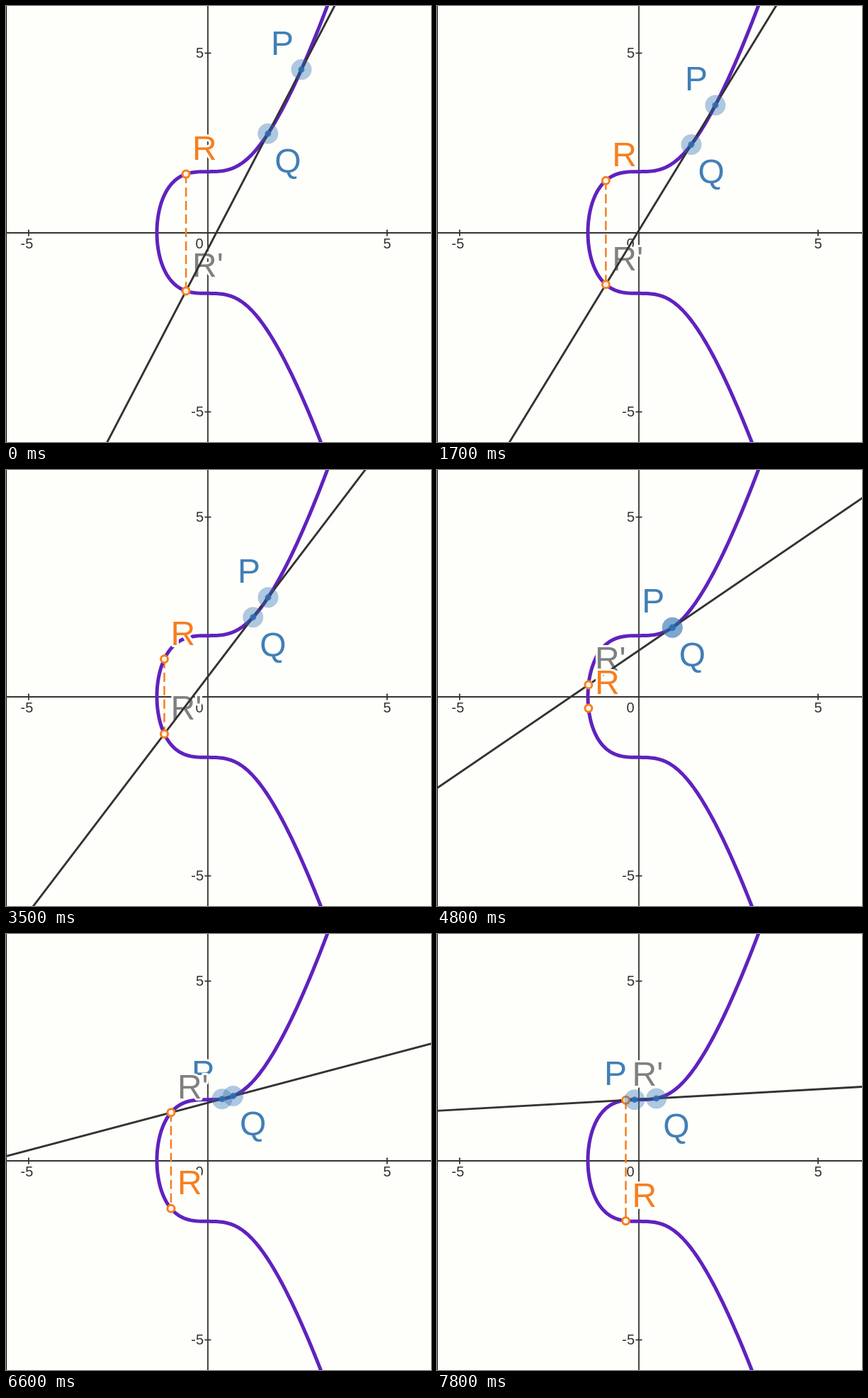
These frames come from a looping animation (600 px wide and 615 px high, 7900 ms). An HTML page with a canvas:

```html
<!DOCTYPE html>
<html lang="en">
<head>
<meta charset="utf-8">
<title>Chord and third point on a cubic curve</title>
<style>
  html, body { margin: 0; width: 100%; height: 100%; overflow: hidden; background: #fefefb; }
  canvas { display: block; width: 600px; height: 615px; }
</style>
</head>
<body>
<canvas id="stage" width="600" height="615"></canvas>
<script>
const ctx = document.getElementById('stage').getContext('2d');
const W = 600, H = 615, LOOP = 7900, STEP = 100;
const UNIT = 50.6, OX = 285, OY = 319.5, B = 2.88;
const PAPER = '#fefefb', INK = '#333', PURPLE = '#6022be',
      ORANGE = '#f57f20', BLUE = '#417fb6', GRAY = '#808080';

// Drag of P: time in ms, x in graph units
const DRAG = [[0, 2.609], [1700, 2.134], [3500, 1.68], [4000, 1.58], [4800, 0.935],
              [5800, 0.583], [6600, 0.395], [7300, 0.237], [7800, -0.119]];
const MEET = 0.935;

const sx = x => OX + x * UNIT;
const sy = y => OY - y * UNIT;
const curveY = x => Math.sqrt(Math.max(0, x ** 3 + B));

function dragX(t) {
  const i = Math.max(1, DRAG.findIndex(([time]) => time >= t));
  const [t0, x0] = DRAG[i - 1], [t1, x1] = DRAG[i];
  return x0 + (x1 - x0) * (t - t0) / (t1 - t0);
}

// Q trails P and coincides with it at MEET
function followX(px) {
  const d = px - MEET;
  return MEET + 0.432 * d + 0.0066 * d * d;
}

function stroke(points, color, width, dash = []) {
  ctx.beginPath();
  points.forEach(([x, y]) => ctx.lineTo(x, y));
  ctx.strokeStyle = color;
  ctx.lineWidth = width;
  ctx.setLineDash(dash);
  ctx.stroke();
  ctx.setLineDash([]);
}

function disc([x, y], r, color) {
  ctx.beginPath();
  ctx.arc(x, y, r, 0, 2 * Math.PI);
  ctx.fillStyle = color;
  ctx.fill();
}

function ring(point) {
  disc(point, 6.5, ORANGE);
  disc(point, 3.5, '#fff6ea');
}

function label(text, x, y, color, size = 48, align = 'left') {
  ctx.font = `${size}px "Liberation Sans", Arial, sans-serif`;
  ctx.textAlign = align;
  ctx.lineJoin = 'round';
  ctx.strokeStyle = PAPER;
  ctx.lineWidth = size / 8;
  ctx.strokeText(text, x, y);
  ctx.fillStyle = color;
  ctx.fillText(text, x, y);
}

function drawAxes() {
  ctx.fillStyle = PAPER;
  ctx.fillRect(0, 0, W, H);
  stroke([[0.5, 0], [0.5, H]], '#000', 1);
  stroke([[0, 320], [W, 320]], INK, 1.8);
  stroke([[OX, 0], [OX, H]], INK, 1.8);
  for (const v of [-5, 5]) {
    stroke([[sx(v), 315.5], [sx(v), 324.5]], INK, 1.8);
    stroke([[OX - 4.5, sy(v)], [OX + 4.5, sy(v)]], INK, 1.8);
    label(v, v < 0 ? 29.5 : 538, 342, INK, 20, 'center');
    label(v, 279, sy(v) + 6.5, INK, 20, 'right');
  }
  label('0', 278.5, 342, INK, 20, 'right');
}

const root = -Math.cbrt(B);
const curve = Array.from({ length: 241 }, (_, i) => {
  const s = i / 120 - 1;
  const x = root + 5 * s * s;
  return [sx(x), sy(-Math.sign(s) * curveY(x))];
});

function draw(t) {
  const px = dragX(t), qx = followX(px);
  const py = curveY(px), qy = curveY(qx);
  // chord slope in a form that becomes the tangent when P meets Q
  const m = (px * px + px * qx + qx * qx) / (py + qy);
  const lineY = x => py + m * (x - px);
  const rx = m * m - px - qx, ry = lineY(rx);
  const P = [sx(px), sy(py)], Q = [sx(qx), sy(qy)];
  const R = [sx(rx), sy(-ry)], mirror = [sx(rx), sy(ry)];

  drawAxes();
  stroke([R, mirror].sort((a, b) => a[1] - b[1]), ORANGE, 2.5, [13, 6]);
  stroke(curve, PURPLE, 5);
  label('P', P[0] - 43, P[1] - 21, BLUE);
  label('Q', Q[0] + 9.5, Q[1] + 55, BLUE);
  label("R'", mirror[0] + 9, mirror[1] - 20, GRAY);
  stroke([-6, 7].map(x => [sx(x), sy(lineY(x))]), INK, 2.9);
  label('R', R[0] + 9, R[1] - 20, ORANGE);
  ring(R);
  ring(mirror);
  for (const p of [P, Q]) disc(p, 14.5, 'rgba(45,112,179,.38)');
  for (const p of [P, Q]) disc(p, 4.5, 'rgba(45,112,179,.85)');
}

const start = performance.now();
function tick() {
  const t = (performance.now() - start) % LOOP;
  draw(Math.floor(t / STEP) * STEP);
  requestAnimationFrame(tick);
}
tick();
</script>
</body>
</html>
```
